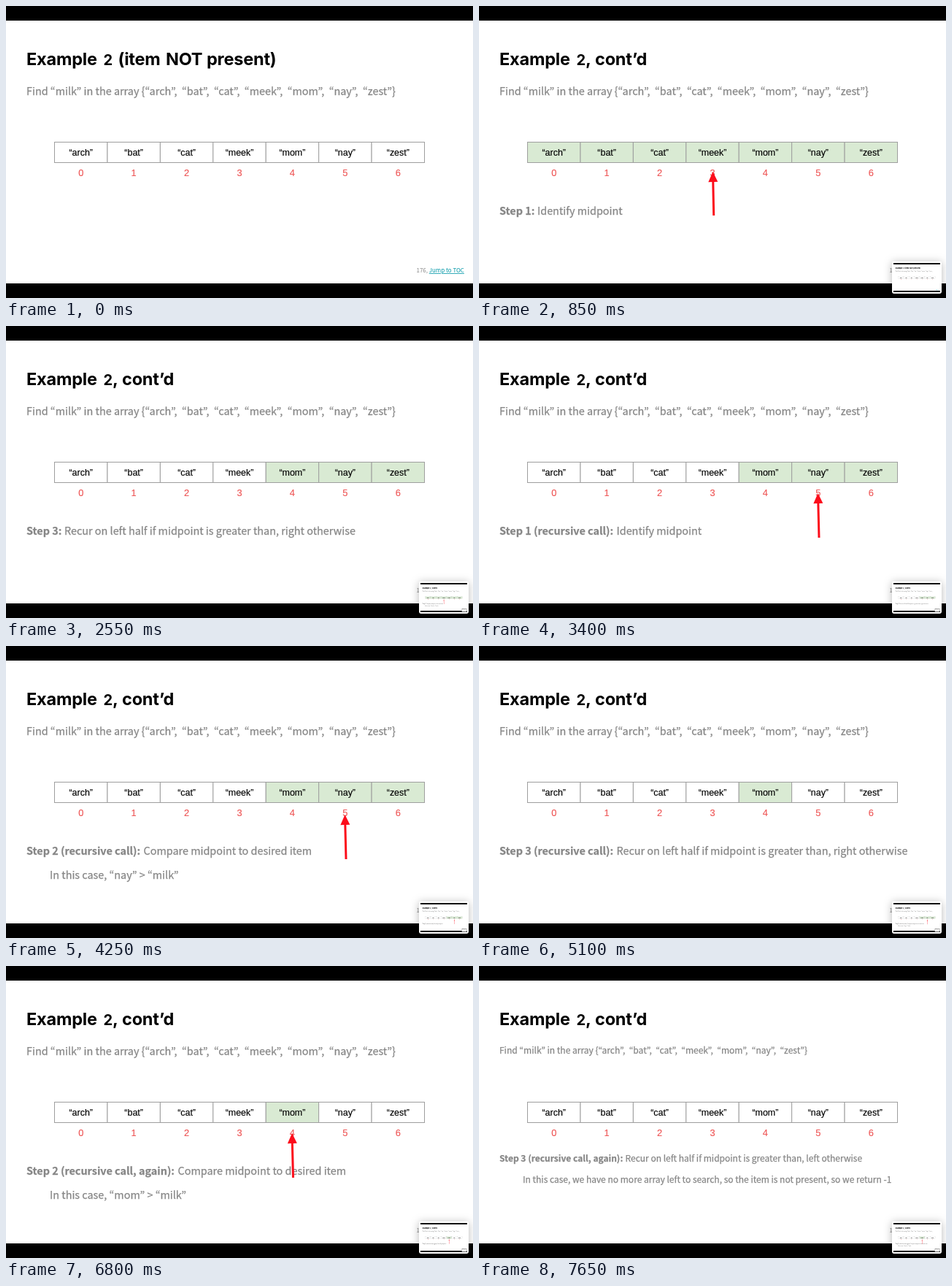
An HTML page that plays this animation: 640 by 400 pixels, repeating every 8.5 s.

```html
<!DOCTYPE html>
<html lang="en">
<head>
<meta charset="utf-8">
<title>Binary search, item not present</title>
<style>
  html, body { margin: 0; width: 100%; height: 100%; overflow: hidden; background: #000; }
  svg { display: block; width: 100%; height: 100%; }
  text { white-space: pre; }
  .title { font: 700 23.5px Inter, sans-serif; letter-spacing: -.2px; }
  .numeral { font-size: 20px; }
  .body, .page {
    font-family: "Noto Sans CJK KR", "Noto Sans CJK JP", "Noto Sans CJK SC", "Open Sans", sans-serif;
    font-variant-east-asian: proportional-width;
    fill: #868686;
  }
  .body { font-size: 14.4px; stroke: #868686; stroke-width: .25px; }
  .small { font-size: 12px; }
  .page { font-size: 7.96px; }
  .bold { font-weight: 700; }
  .link { fill: #0097a7; text-decoration: underline; }
  .cell, .index { font: 12.44px "Liberation Sans", Arial, sans-serif; text-anchor: middle; }
  .cell { stroke: #000; stroke-width: .15px; }
  .index { font-size: 12.8px; fill: #ee5757; stroke: #ee5757; stroke-width: .15px; }
  .slide { animation: show 8.5s step-end infinite; }
  @keyframes show {
    0% { visibility: visible; }
    10%, 100% { visibility: hidden; }
  }
</style>
</head>
<body>
<svg id="stage" viewBox="0 0 640 400">
  <defs>
    <filter id="shadow" x="-40%" y="-60%" width="180%" height="220%">
      <feDropShadow dx="0" dy="1" stdDeviation="6" flood-color="#000" flood-opacity=".28"/>
    </filter>
  </defs>
</svg>
<script>
const WORDS = ['arch', 'bat', 'cat', 'meek', 'mom', 'nay', 'zest'];
const LEFT = 66.5, TOP = 186.5, CELL = 507 / 7, ROW = 28;
const SLIDE_SECONDS = 0.85;

const quote = word => `“${word}”`;
const IDENTIFY = 'Identify midpoint';
const COMPARE = 'Compare midpoint to desired item';
const recur = side => `Recur on left half if midpoint is greater than, ${side} otherwise`;
const inCase = (word, sign) => `In this case, ${quote(word)} ${sign} “milk”`;

// green: highlighted cell range; arrow: tip x, tip y, tail x, tail y
const slides = [
  {},
  { green: [0, 6], arrow: [320.5, 227, 321.7, 287], step: 'Step 1:', x: 80, text: IDENTIFY },
  { green: [0, 6], arrow: [320.5, 229, 321.7, 290], step: 'Step 2:', x: 80, text: COMPARE, note: inCase('meek', '&lt;') },
  { green: [4, 6], step: 'Step 3:', x: 80, text: recur('right') },
  { green: [4, 6], arrow: [464.5, 229, 466, 290], step: 'Step 1 (recursive call):', x: 188.5, text: IDENTIFY },
  { green: [4, 6], arrow: [464.5, 231, 466, 292], step: 'Step 2 (recursive call):', x: 188.5, text: COMPARE, note: inCase('nay', '&gt;') },
  { green: [4, 4], step: 'Step 3 (recursive call):', x: 188.5, text: recur('right') },
  { green: [4, 4], arrow: [392, 227, 393.5, 288], step: 'Step 1 (recursive call, again):', x: 235.5, text: IDENTIFY },
  { green: [4, 4], arrow: [392, 229, 393.5, 290], step: 'Step 2 (recursive call, again):', x: 235.5, text: COMPARE, note: inCase('mom', '&gt;') },
  { small: true, step: 'Step 3 (recursive call, again):', x: 200.5, text: recur('left'),
    note: 'In this case, we have no more array left to search, so the item is not present, so we return -1' },
];

const label = (x, y, text, cls) => `<text x="${x}" y="${y}" class="${cls}">${text}</text>`;
const rect = (x, y, w, h, attrs) => `<rect x="${x}" y="${y}" width="${w}" height="${h}" ${attrs}/>`;

function title(first) {
  const rest = first
    ? [[153.5, '(item'], [219, 'NOT'], [275, 'present)']]
    : [[146, ','], [159, 'cont’d']];
  return label(28, 80.5, 'Example', 'title')
    + label(133.5, 80.5, '2', 'title numeral')
    + rest.map(([x, word]) => label(x, 80.5, word, 'title')).join('');
}

function table([from, to] = [1, 0]) {
  return WORDS.map((word, i) => {
    const x = LEFT + i * CELL, middle = x + CELL / 2;
    const fill = i >= from && i <= to ? '#d9ead3' : '#fff';
    return rect(x, TOP, CELL, ROW, `fill="${fill}" stroke="#9e9e9e"`)
      + label(middle, 205, quote(word), 'cell')
      + label(middle, 233, i, 'index');
  }).join('');
}

function arrow([tipX, tipY, tailX, tailY]) {
  const length = Math.hypot(tailX - tipX, tailY - tipY);
  const angle = Math.atan2(tipX - tailX, tailY - tipY) * 180 / Math.PI;
  return `<g transform="translate(${tipX} ${tipY}) rotate(${angle})" fill="#fc0d1b">
    <path d="M0 0L6.5 14H1.5V${length}H-1.5V14H-6.5Z"/></g>`;
}

function thumbnail(i, depth) {
  return rect(566, 350, 68, 44, 'rx="3" fill="#fff" filter="url(#shadow)"')
    + `<g transform="translate(568 352) scale(.1)">${slide(i, depth)}</g>`;
}

function slide(i, depth = 0) {
  const s = slides[i];
  const size = s.small ? 'body small' : 'body';
  const [findY, stepY, noteY] = s.small ? [120, 267.5, 297] : [122.3, 286.3, 319];
  const list = WORDS.map(quote).join(',  ');
  return rect(0, 0, 640, 400, '') + rect(0, 20, 640, 360, 'fill="#fff"')
    + title(i === 0)
    + label(28, findY, `Find “milk” in the array {${list}}`, size)
    + table(s.green)
    + (s.step ? label(28, stepY, s.step, size + ' bold') + label(s.x, stepY, s.text, size) : '')
    + (s.note ? label(60, noteY, s.note, size) : '')
    + label(562.5, 365, `${176 + i}, <tspan class="link">Jump to TOC</tspan>`, 'page')
    + (s.arrow ? arrow(s.arrow) : '')
    + (i > 0 && depth < 2 ? thumbnail(i - 1, depth + 1) : '');
}

document.getElementById('stage').insertAdjacentHTML('beforeend', slides.map((_, i) => {
  const delay = (i - slides.length) * SLIDE_SECONDS;
  return `<g class="slide" style="animation-delay:${delay.toFixed(2)}s">${slide(i)}</g>`;
}).join(''));
</script>
</body>
</html>
```
